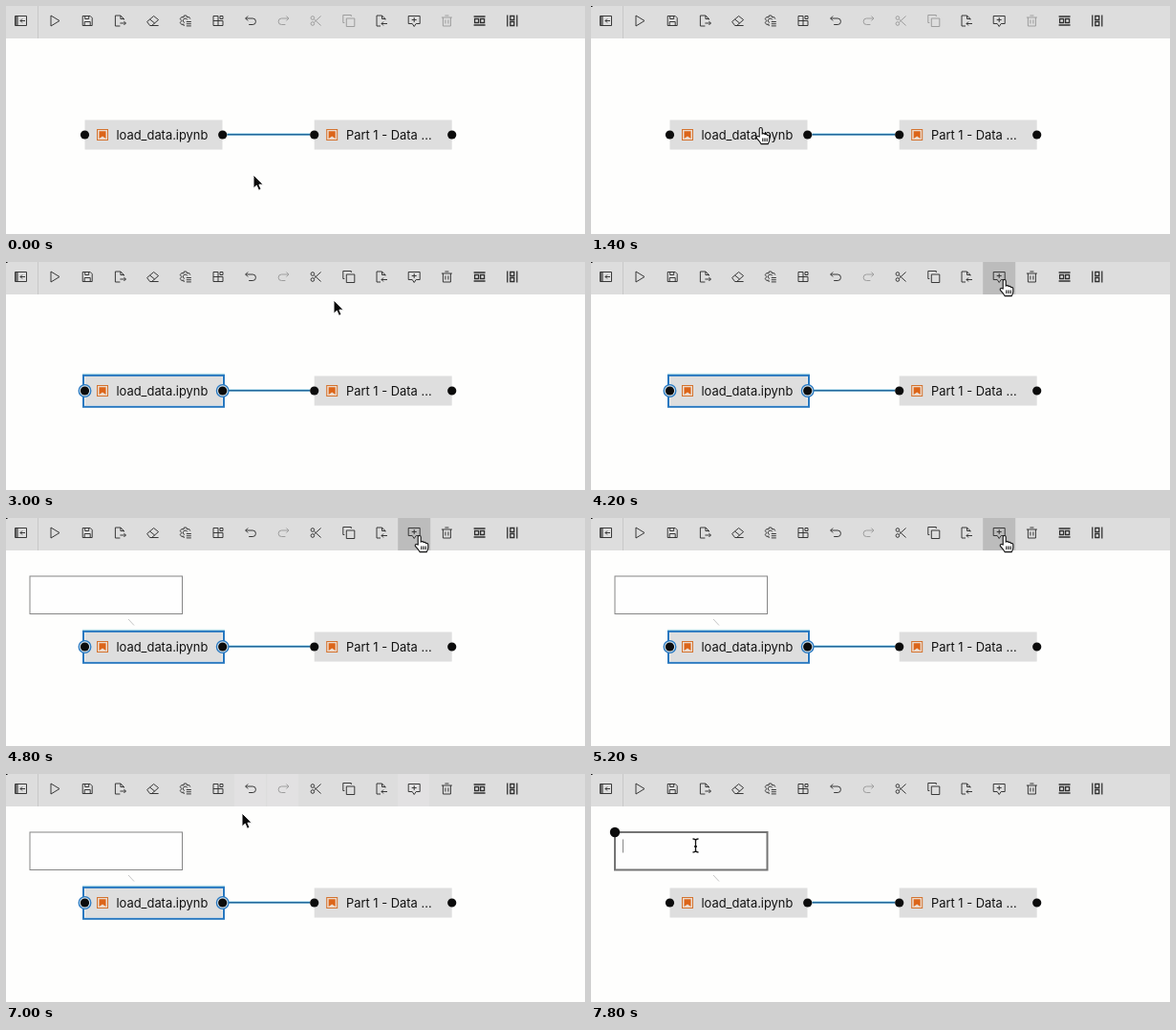
Write an HTML page that moves like this. It is 606 by 239 pixels and loops after 8 s.

```html
<!DOCTYPE html>
<html>
<head>
<meta charset="utf-8">
<style>
html, body { margin: 0; width: 100%; height: 100%; overflow: hidden; background: #fefefd; }
svg { display: block; }
text { font: 12.9px Inter, "Open Sans", sans-serif; fill: #111; }
#icons path { fill: none; stroke: #303030; stroke-width: .95; }
#icons .off path { stroke: #9a9a9a; }
</style>
</head>
<body>
<svg width="606" height="239" viewBox="0 0 606 239">
  <defs>
    <g id="node">
      <rect y="119.5" width="144" height="31" fill="#dedede"/>
      <rect x="13" y="129.5" width="11" height="11" fill="#ecdccf" stroke="#d4722e"/>
      <path d="M15 131.3h7v7.7l-3.5-2.4-3.5 2.4z" fill="#dc6519"/>
    </g>
  </defs>
  <rect width="606" height="34" fill="#dddddd"/>
  <g id="glow" fill="#e2e1e2"></g>
  <rect id="hover" width="34" height="34" fill="#bcbcbc"/>
  <path d="M33.5 0V34" stroke="#c8c8c8"/>
  <g id="icons"></g>
  <rect id="speck" width="1.5" height="1" fill="#111"/>

  <path d="M231.500 134.500H318" stroke="#bfe5f2" stroke-width="3"/>
  <path d="M231.500 134.700H318" stroke="#23689c" stroke-width="1.400"/>
  <use href="#node" x="82.5"/>
  <use href="#node" x="322.7"/>
  <text x="115.5" y="140.4">load_data.ipynb</text>
  <text x="356" y="140.4">Part 1 - Data ...</text>
  <g id="selected" stroke="#2878c0" fill="none">
    <path d="M80 117.300H229" stroke="#a9dde6"/>
    <rect x="81" y="118.900" width="147" height="32.900" stroke-width="2"/>
    <g fill="#d5e3ec" stroke-width="1.300">
      <circle cx="82.5" cy="135" r="6.300"/>
      <circle cx="226.700" cy="135" r="6.300"/>
    </g>
  </g>
  <g fill="#0c0c0c">
    <circle cx="82.5" cy="135" r="4.600"/><circle cx="226.700" cy="135" r="4.600"/>
    <circle cx="322.700" cy="135" r="4.600"/><circle cx="466.700" cy="135" r="4.600"/>
  </g>

  <g id="comment">
    <rect id="box" x="25" y="61" width="159.5" height="39.5" fill="#fefefe" stroke="#868686"/>
    <path d="M128 106l6 6.5" stroke="#c4c4c4"/>
    <circle id="handle" cx="25" cy="61" r="5.2" fill="#0c0c0c"/>
    <path id="caret" d="M33.5 68.5V82.5" stroke="#888"/>
  </g>

  <g id="cursor">
    <path id="arrow" d="M0 0V14.2L3.3 11.2 5.5 16.3 8.1 15.2 5.9 10.2H10.3Z" fill="#0a0a0a" stroke="#fff"/>
    <path id="hand" transform="translate(0 -1)" d="M-1.8 9V1a1.5 1.5 0 0 1 3 0V6q2.4-1 2.9.6 2-.7 2.6 1 2.1-.4 2.1 1.6v2.8q0 2-1.5 4.6h-7.2q-1.3-2.6-4.8-6.3-.6-2.6 2.9-1.3zM1.8 10.5v3.5M4 10.5v3.5M6.2 10.5v3.5" fill="#fff" stroke="#111" stroke-width="1.1"/>
    <path id="beam" d="M-3-7Q0-7 0-5 0-7 3-7M0-5V5M-3 7Q0 7 0 5 0 7 3 7M-1.5 1h3" fill="none" stroke="#111" stroke-width="1.3"/>
  </g>
</svg>
<script>
const $ = id => document.getElementById(id);
const show = (id, on) => $(id).style.display = on ? '' : 'none';
const pitch = 34.2;
const buttonX = i => 34 + pitch * (i - 1);

// Toolbar glyphs, each centred on 0,0
const glyphs = [
  'M-6-5H6V5H-6ZM-4.7-5V5M-3.5-5V5M4.5 0H-.5M1.5-2L-.5 0l2 2',
  'M-4-5.5L5 0-4 5.5Z',
  'M-5-5H3L5-3V5H-5ZM-2.5-5v3h4v-3M-3 5V1H3V5',
  'M4-1V-2L.5-5.5H-5V5.5H0M.5-5.5V-2H4M0 2.5H6M4 .5l2 2-2 2',
  'M-6 1L1-5 6-1-1 5H-3ZM-3-1.5L2 2.5M-2 5H6',
  'M5-2L3.8-4 2-3.5 1-5.5H-1.5L-2-3.5-4-4-5.5-2-4 0-5.5 2-4 4-2 3.5-1.5 5.5M2-1A2.3 2.3 0 1 0-1 2M1 1H6M1 3.2H6M1 5.4H6',
  'M0-5H-5V5H5V0H-5M0-5V5M2-5H5V-2H2Z',
  'M-3-5L-5.5-2.5-3 0M-5.5-2.5H2A3.2 3.2 0 0 1 2 4H-2',
  'M3-5L5.5-2.5 3 0M5.5-2.5H-2A3.2 3.2 0 0 0-2 4H2',
  'M5-5L-2 1.5M5 5L-2-1.5M-5.5-3a1.8 1.8 0 1 0 3.6 0 1.8 1.8 0 1 0-3.6 0M-5.5 3a1.8 1.8 0 1 0 3.6 0 1.8 1.8 0 1 0-3.6 0',
  'M-2.5-2.5H6V6H-2.5ZM-4.5 2H-6V-6H2.5V-4.5',
  'M4-1V-2L.5-5.5H-5V5.5H-1M.5-5.5V-2H4M6 3H0M2 1L0 3l2 2',
  'M-6-5H6V3H2L0 6-2 3H-6ZM0-3.5V1.5M-2.5-1H2.5',
  'M-5.5-3.5H5.5M-4-3.5V5.5H4V-3.5M-2-5.5H2M-1.5-1V3M1.5-1V3',
  'M-6-4.5H6M-6 4.5H6M-5-2H-1V2H-5ZM1-2H5V2H1Z',
  'M-5-6V6M5-6V6M-2-5H2V-1H-2ZM-2 1H2V5H-2Z'
];
const bold = [14, 15], redo = 8, needsSelection = [9, 10, 13];
$('icons').innerHTML = glyphs.map((d, i) =>
  `<g transform="translate(${i ? buttonX(i) + 17 : 15.5} 15.5)"><path d="${d}"${bold.includes(i) ? ' style="stroke-width:1.3"' : ''}/></g>`).join('');
$('glow').innerHTML = [7, 8, 12].map(i => `<rect x="${buttonX(i)}" width="33" height="34"/>`).join('');
const icons = $('icons').children;
icons[redo].setAttribute('class', 'off');

// Pointer path: time, x, y
const path = [[0, 259, 177], [1200, 178, 129], [1800, 178, 129], [3000, 343, 40],
  [4200, 433, 20], [6400, 433, 20], [7000, 247, 41], [7500, 109.5, 75], [8000, 109.5, 75]];

function pointer(t) {
  const k = path.findIndex(p => p[0] > t), a = path[k - 1], b = path[k];
  const u = (t - a[0]) / (b[0] - a[0]);
  const e = u * u * (3 - 2 * u);
  return [a[1] + (b[1] - a[1]) * e, a[2] + (b[2] - a[2]) * e];
}

function draw(t) {
  const [x, y] = pointer(t);
  const onBar = y < 34, editing = t >= 7600;
  const onNode = x > 83 && x < 227 && y > 119 && y < 151;
  const hand = onBar || onNode;
  show('speck', t >= 200);
  show('hover', onBar);
  $('hover').setAttribute('x', buttonX(Math.floor((x - 34) / pitch) + 1));
  show('glow', t >= 6800 && t < 7400);
  for (const i of needsSelection) icons[i].setAttribute('class', t < 1600 ? 'off' : '');
  show('selected', t >= 1600 && !editing);
  show('comment', t >= 4800);
  $('box').setAttribute('stroke-width', editing ? 2 : 1);
  $('box').setAttribute('stroke', editing ? '#747474' : '#868686');
  show('handle', editing);
  show('caret', t >= 7800);
  $('cursor').setAttribute('transform', `translate(${x} ${y})`);
  show('hand', hand);
  show('beam', editing);
  show('arrow', !hand && !editing);
}

const start = performance.now();
function tick() {
  const t = (performance.now() - start) % 8000;
  draw(Math.floor(t / 200) * 200); // five pictures a second
  requestAnimationFrame(tick);
}
tick();
</script>
</body>
</html>
```
